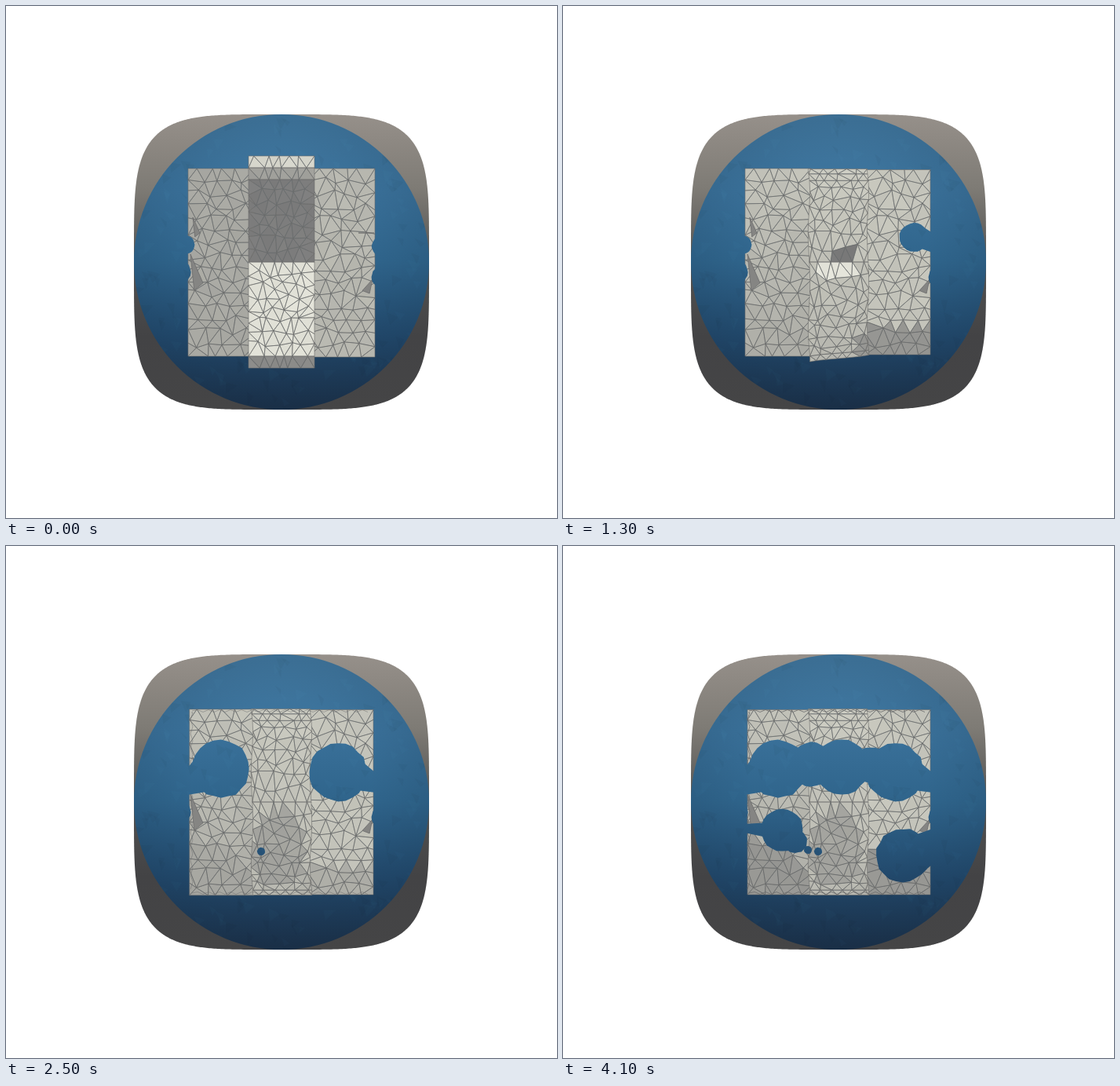
Write an HTML page with a canvas that moves like this. It is 702 px wide and 652 px high and loops after 4.2 s.

```html
<!DOCTYPE html>
<html lang="en">
<head>
<meta charset="utf-8">
<title>Mesh erosion</title>
<style>
html, body { margin: 0; width: 100%; height: 100%; overflow: hidden; background: #fff; }
canvas { display: block; }
</style>
</head>
<body>
<canvas id="view" width="702" height="652"></canvas>
<script>
const W = 702, H = 652, LOOP = 4200, CX = 351, CY = 326, R = 188;
const LINE = '#6d6d6c';
const view = document.getElementById('view').getContext('2d');

function layer() {
  const c = document.createElement('canvas');
  c.width = W;
  c.height = H;
  return c.getContext('2d');
}

function random(seed) {
  return () => {
    seed = (seed * 1664525 + 1013904223) >>> 0;
    return seed / 4294967296;
  };
}

const mix = (a, b, k) => a + (b - a) * k;
const ramp = (t, a, b) => Math.min(1, Math.max(0, (t - a) / (b - a)));

// Warm grey: blue falls behind as the tone gets lighter
const css = v => `rgb(${Math.round(v)},${Math.round(v)},${Math.round(v - ramp(v, 125, 200) * 10)})`;

function trace(g, pts) {
  g.beginPath();
  for (const [x, y] of pts) g.lineTo(x, y);
  g.closePath();
}

function circle(p, q, r) {
  const d = 2 * (p[0] * (q[1] - r[1]) + q[0] * (r[1] - p[1]) + r[0] * (p[1] - q[1]));
  const [a, b, c] = [p, q, r].map(v => v[0] * v[0] + v[1] * v[1]);
  const x = (a * (q[1] - r[1]) + b * (r[1] - p[1]) + c * (p[1] - q[1])) / d;
  const y = (a * (r[0] - q[0]) + b * (p[0] - r[0]) + c * (q[0] - p[0])) / d;
  return { x, y, rr: (p[0] - x) ** 2 + (p[1] - y) ** 2 };
}

// Bowyer-Watson triangulation
function triangulate(pts) {
  const n = pts.length;
  const all = [...pts, [-40000, -30000], [41000, -30000], [300, 60000]];
  const make = (a, b, c) => ({ v: [a, b, c], o: circle(all[a], all[b], all[c]) });
  let tris = [make(n, n + 1, n + 2)];
  for (let i = 0; i < n; i++) {
    const [x, y] = all[i], rim = new Map();
    tris = tris.filter(({ v, o }) => {
      if ((x - o.x) ** 2 + (y - o.y) ** 2 >= o.rr) return true;
      for (let e = 0; e < 3; e++) {
        const a = v[e], b = v[(e + 1) % 3];
        const id = Math.min(a, b) + '-' + Math.max(a, b);
        if (rim.has(id)) rim.delete(id); else rim.set(id, [a, b]);
      }
      return false;
    });
    for (const [a, b] of rim.values()) tris.push(make(a, b, i));
  }
  return tris.map(t => t.v).filter(v => v.every(i => i < n));
}

function makePanel(x0, y0, x1, y1, cols, rows, seed, straight = []) {
  const rnd = random(seed), pts = [];
  const dx = (x1 - x0) / cols, dy = (y1 - y0) / rows;
  for (let r = 0; r <= rows; r++) {
    for (let c = 0; c <= cols; c++) {
      const jx = (rnd() - 0.5) * 0.55 + (r % 2 ? 0.25 : -0.25);
      const jy = (rnd() - 0.5) * 0.65;
      const flatX = c === 0 || c === cols;
      const flatY = r === 0 || r === rows || straight.includes(r);
      pts.push([x0 + (c + (flatX ? 0 : jx)) * dx, y0 + (r + (flatY ? 0 : jy)) * dy]);
    }
  }
  const tris = triangulate(pts).map(v => {
    const mean = axis => v.reduce((sum, i) => sum + pts[i][axis], 0) / 3;
    return { v, x: mean(0), y: mean(1), tone: (rnd() - 0.5) * 7 };
  });
  return { pts, tris };
}

const left = makePanel(232, 207, 316, 446, 5, 15, 11);
const right = makePanel(385, 207, 470, 447, 5, 15, 29);
const middle = makePanel(309, 191, 393, 461, 6, 18, 47, [1, 2, 9, 17]);

// Pull the outer border of a side panel in to the worn frame
function wear([x, y], k) {
  const nx = Math.min(468, Math.max(235, x)), ny = Math.min(444, Math.max(208.5, y));
  return [mix(x, nx, k), mix(y, ny, k)];
}

const warpLeft = (p, t) => wear(p, ramp(t, 1800, 3000));
const warpRight = (p, t) => wear(p, ramp(t, 1000, 1300));

// Crowds points towards both ends of -1..1
const squeeze = u => mix(u, Math.sin(u * Math.PI / 2), 0.6);
const settle = t => 1 - (1 - ramp(t, 200, 1000)) ** 2;

function warpMiddle([x, y], t) {
  const u = (x - CX) / 42, v = (y - CY) / 135, d = settle(t);
  const sag = 17 * (1 - ramp(t, 200, 2400)) * mix(1, (1 - u) / 2, ramp(t, 800, 1300));
  const nx = CX + squeeze(u) * 37.5 + Math.sin(y / 17) * 1.2;
  const ny = CY + squeeze(v) * 118.5 + sag * Math.max(0, v);
  return [mix(x, nx, d), mix(y, ny, d)];
}

function shadeLeft({ x, y }, t) {
  const v = mix(169, mix(196, 172, (y - 206) / 240), ramp(t, 200, 800));
  const inShade = y > 372 && x - 236 < y - 340;
  return inShade ? mix(v, 152, ramp(t, 1800, 3000) ** 2) : v;
}

function shadeRight({ y }, t) {
  const v = mix(184, 197, ramp(t, 300, 1300));
  const shade = ramp(t, 1100, 1300) - 0.5 * ramp(t, 1300, 1800) + 0.45 * ramp(t, 2500, 3000);
  return y > mix(408, 388, ramp(t, 2500, 3000)) ? mix(v, 150, shade) : v;
}

function shadeMiddle({ x, y }, t) {
  const row = Math.floor((y - 191) / 15);
  const raw = row < 1 ? 213 : row < 2 ? 160 : row < 9 ? 125 : row < 17 ? 225 : 138;
  let v = mix(raw, mix(204, 184, (y - 191) / 270), settle(t));
  const fold = ramp(t, 300, 700) * (1 - ramp(t, 1300, 1700));
  const end = mix(393, 374, ramp(t, 800, 1300));
  if (row === 8 && x > 345 && x < end) v = mix(v, 122, fold);
  if (row === 9 && x > 328 && x < end) v = mix(v, 229, fold);
  if (x > 372 && y > 412) v = mix(v, 152, ramp(t, 1100, 1300) * (1 - 0.8 * ramp(t, 1300, 1800)));
  if (Math.hypot((x - 347) / 36, (y - 385) / 50) < 1) v = mix(v, 160, 0.85 * ramp(t, 1800, 2500));
  return v;
}

function drawPanel(g, { pts, tris }, warp, shade, t) {
  const p = pts.map(v => warp(v, t));
  const corners = tri => tri.v.map(i => p[i]);
  for (const tri of tris) {
    trace(g, corners(tri));
    g.fillStyle = css(shade(tri, t) + tri.tone);
    g.fill();
  }
  g.strokeStyle = LINE;
  g.lineWidth = 0.8;
  g.lineJoin = 'round';
  for (const tri of tris) {
    trace(g, corners(tri));
    g.globalAlpha = 0.75;
    g.stroke();
  }
  g.globalAlpha = 1;
}

// Dark chipped corner beside a border notch
function chip(g, x, y, w, h) {
  trace(g, [[x, y], [x + w, y + h * 0.8], [x + w * 0.3, y + h]]);
  g.fillStyle = '#858583';
  g.fill();
  g.stroke();
}

// Crumpled strips along the worn borders
function drawCrumple(g, t) {
  g.globalAlpha = ramp(t, 1800, 3000);
  g.beginPath();
  for (const y of [210, 442]) {
    for (let x = 237, i = 0; x < 467; x += 7, i++) {
      if (i) g.lineTo(x, y + (i % 2 ? -1.5 : 1.5)); else g.moveTo(x, y);
    }
  }
  g.moveTo(236, 212);
  for (let y = 212, i = 0; y < 442; y += 9, i++) g.lineTo(i % 2 ? 235 : 238, y);
  g.stroke();
  g.globalAlpha = 1;
}

function blob(g, x, y, r) {
  if (r <= 0) return;
  const rnd = random(Math.round(x * 7 + y)), pts = [];
  for (let i = 0; i < 24; i++) {
    const a = i / 24 * Math.PI * 2, q = r * (0.97 + rnd() * 0.07);
    pts.push([x + Math.cos(a) * q, y + Math.sin(a) * q]);
  }
  trace(g, pts);
  g.fill();
}

// A round hole that eats inwards from an opening in the side border
function bite(g, k, edge, top, bottom, x, y, r) {
  if (k <= 0) return;
  const cx = mix(edge, x, k), cy = mix((top + bottom) / 2, y, k), q = r * k;
  blob(g, cx, cy, q);
  const inner = cx + Math.sign(edge - x) * q * 0.55;
  const reach = Math.min(q * 0.8, (bottom - top) * 0.9);
  trace(g, [[inner, cy - reach], [edge, top], [edge, bottom], [inner, cy + reach]]);
  g.fill();
}

function drawHoles(g, t) {
  g.globalCompositeOperation = 'destination-out';
  g.fillStyle = '#000';
  blob(g, 228, 304, 12);
  blob(g, 217, 339, 18);
  blob(g, 480, 306, 14);
  blob(g, 480, 345, 14);

  bite(g, 0.5 * ramp(t, 1100, 1300) + 0.5 * ramp(t, 1300, 1800), 471, 289, 314, 423, 288, 36.5);
  bite(g, ramp(t, 1800, 2400), 231, 283, 317, 274, 284, 36.5);
  blob(g, 325, 389, 5 * ramp(t, 2300, 2500));
  bite(g, ramp(t, 3200, 3500), 471, 360, 405, 433, 394, 34);

  const low = ramp(t, 3300, 3700);
  bite(g, low, 231, 354, 365, 279, 362, 27);
  blob(g, 296, 376, 15 * low);
  blob(g, 312, 387, 5 * low);

  const top = ramp(t, 3800, 4100);
  blob(g, 316, 278, 28 * top);
  blob(g, 355, 281, 35 * top);
  blob(g, 392, 279, 23 * top);
  g.globalCompositeOperation = 'source-over';
}

function fade(g, ...colours) {
  const f = g.createLinearGradient(0, CY - R, 0, CY + R);
  colours.forEach((c, i) => f.addColorStop(i / (colours.length - 1), c));
  return f;
}

function drawBackdrop(g) {
  g.fillStyle = '#fff';
  g.fillRect(0, 0, W, H);

  // Superellipse silhouette
  const pow = v => Math.sign(v) * Math.abs(v) ** (2 / 4.4) * R;
  const rim = [];
  for (let a = 0; a < Math.PI * 2; a += 0.01) {
    rim.push([CX + pow(Math.cos(a)), CY + pow(Math.sin(a))]);
  }
  trace(g, rim);
  g.fillStyle = fade(g, '#96908a', '#7e7b75', '#535352', '#434345', '#454546');
  g.fill();

  g.save();
  g.beginPath();
  g.arc(CX, CY, R, 0, Math.PI * 2);
  g.clip();
  g.fillStyle = fade(g, '#41779e', '#3b729b', '#2f648b', '#22496c', '#1b3048');
  g.fillRect(CX - R, CY - R, 2 * R, 2 * R);
  const edge = g.createRadialGradient(CX, CY - 16, R * 0.6, CX, CY, R);
  edge.addColorStop(0, 'rgba(10,30,50,0)');
  edge.addColorStop(1, 'rgba(10,30,50,.1)');
  g.fillStyle = edge;
  g.fillRect(CX - R, CY - R, 2 * R, 2 * R);

  const rnd = random(71);
  for (let i = 0; i < 260; i++) {
    const x = CX + (rnd() * 2 - 1) * R, y = CY + (rnd() * 2 - 1) * R;
    g.fillStyle = rnd() < 0.5 ? 'rgba(0,10,25,.03)' : 'rgba(120,180,220,.02)';
    trace(g, [[x, y], [x + 8 + rnd() * 9, y + rnd() * 8], [x + rnd() * 9, y + 10 + rnd() * 7]]);
    g.fill();
  }
  g.restore();
}

const backdrop = layer(), mesh = layer();
drawBackdrop(backdrop);

function render(t) {
  mesh.clearRect(0, 0, W, H);
  drawPanel(mesh, left, warpLeft, shadeLeft, t);
  drawPanel(mesh, right, warpRight, shadeRight, t);
  chip(mesh, 238, 269, 9, 25);
  chip(mesh, 235, 316, 16, 46);
  chip(mesh, 469, 289, -20, 0);
  chip(mesh, 467, 348, -13, 18);
  drawPanel(mesh, middle, warpMiddle, shadeMiddle, t);
  drawCrumple(mesh, t);
  drawHoles(mesh, t);
  view.drawImage(backdrop.canvas, 0, 0);
  view.drawImage(mesh.canvas, 0, 0);
}

const holds = [600, 3200, 3600, 3800];
let shown = -1;

function tick() {
  let t = Math.floor(performance.now() % LOOP / 100) * 100;
  if (holds.includes(t)) t -= 100;
  if (t !== shown) render(shown = t);
  requestAnimationFrame(tick);
}
tick();
</script>
</body>
</html>
```
